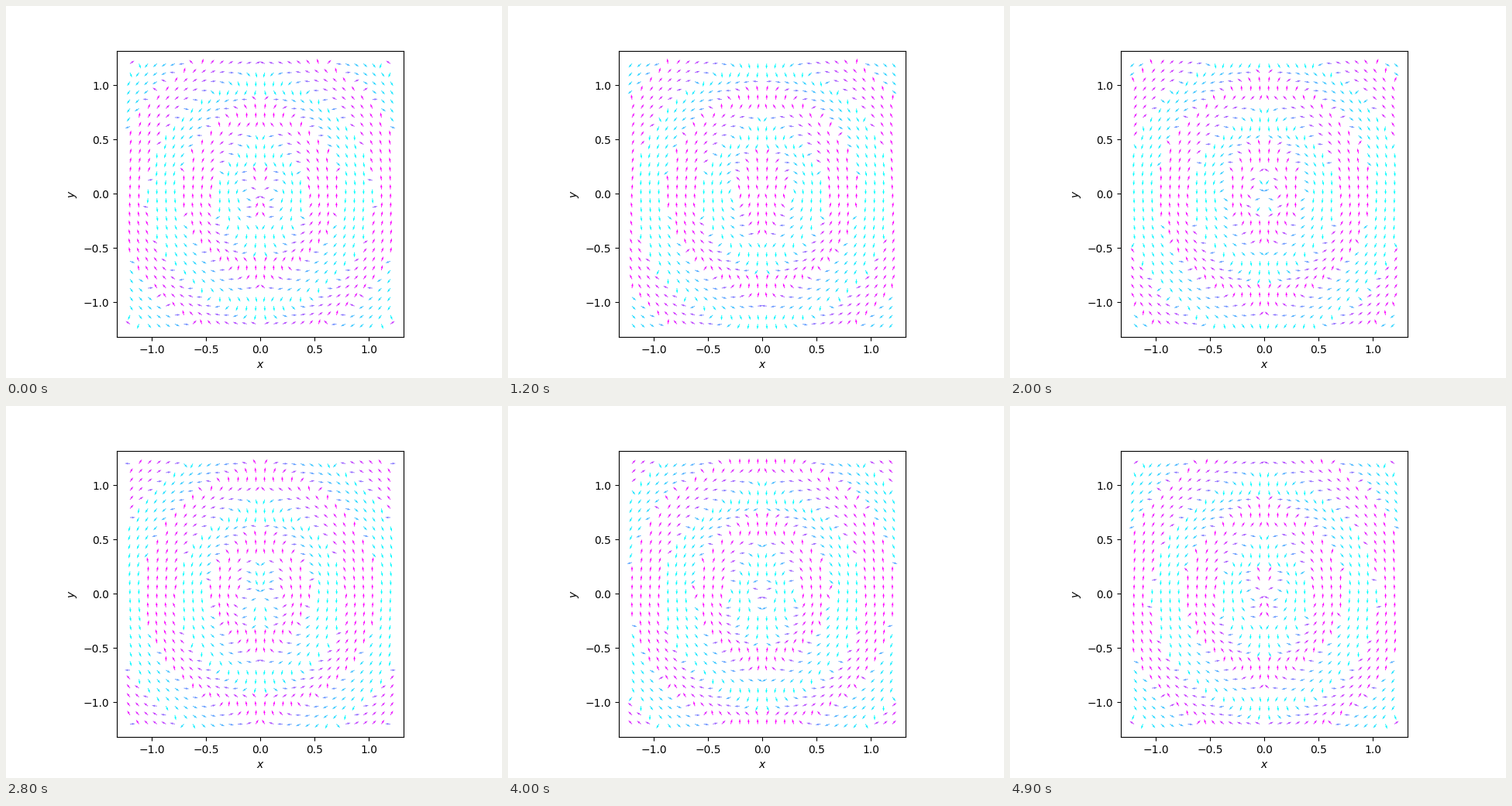
These frames come from a looping animation (640x480 px, 5000 ms). A matplotlib script:

```python
import numpy as np
import matplotlib.pyplot as plt
from matplotlib.animation import FuncAnimation

FRAMES = 50
WAVELENGTH = 0.6
K = 2 * np.pi / WAVELENGTH

axis = np.linspace(-2 * WAVELENGTH, 2 * WAVELENGTH, 30)
X, Y = np.meshgrid(axis, axis)
R = np.hypot(X, Y)
NX, NY = X / R, Y / R


def dipole_direction(phase):
    """Unit vectors of the field of an oscillating vertical dipole."""
    wave = np.exp(1j * (K * R - phase))
    far = K**2 / R
    near = 1 / R**3 - 1j * K / R**2
    ex = np.real(wave * NX * NY * (3 * near - far))
    ey = np.real(wave * (far * (1 - NY**2) + near * (3 * NY**2 - 1)))
    size = np.hypot(ex, ey)
    return ex / size, ey / size


fig, ax = plt.subplots(figsize=(6.4, 4.8), dpi=100)
ax.set_aspect("equal")
ax.set_xlabel("$x$")
ax.set_ylabel("$y$")

u, v = dipole_direction(0)
arrows = ax.quiver(X, Y, u, v, v, cmap="cool", clim=(-1, 1))


def update(frame):
    # The last frame completes the period and repeats the first pose.
    u, v = dipole_direction(2 * np.pi * frame / (FRAMES - 1))
    arrows.set_UVC(u, v, v)
    return (arrows,)


anim = FuncAnimation(fig, update, frames=FRAMES, interval=100, repeat=True)
plt.show()
```
